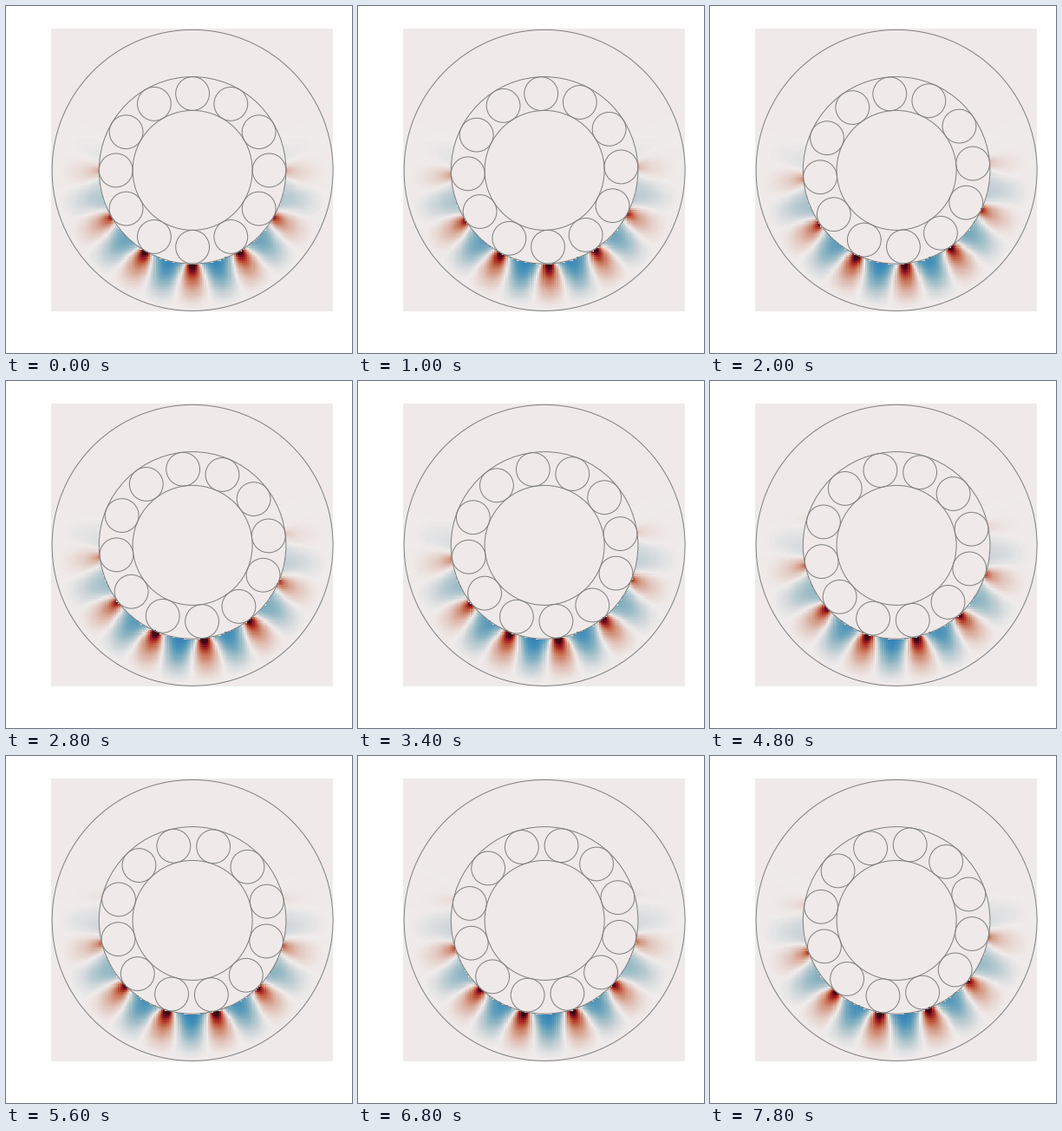
Write a matplotlib script that moves like this. It is 399 px wide and 400 px high and loops after 8000 ms.

```python
import numpy as np
import matplotlib.pyplot as plt
from matplotlib.animation import FuncAnimation
from matplotlib.colors import LinearSegmentedColormap
from matplotlib.patches import Circle

W, H, DPI = 399, 400, 100
CX, CY = 215.1, 189.4
R_OUT, R_RACE, R_SHAFT = 162, 107.8, 69
R_ORBIT, R_BALL, N_BALLS = 88.4, 19.4, 12
FRAMES, INTERVAL = 40, 200
STEP = np.radians(30 / 59)          # cage rotation per frame
LEFT, RIGHT, TOP, BOTTOM = 52, 377, 26, 352
CELLS = 151

blues = [(23, 28, 66), (41, 58, 143), (11, 102, 189),
         (69, 144, 185), (142, 181, 194), (210, 216, 219)]
reds = [(230, 210, 204), (213, 157, 137), (196, 101, 72),
        (172, 43, 36), (120, 14, 40), (60, 9, 17)]
stops = [i / 11 for i in range(6)] + [0.5] + [i / 11 for i in range(6, 12)]
colors = [np.array(c) / 255 for c in blues + [(240, 236, 235)] + reds]
cmap = LinearSegmentedColormap.from_list("stress", list(zip(stops, colors)))

# Polar grid; the angle is measured from straight down towards the right.
xs = LEFT + (np.arange(CELLS) + 0.5) * (RIGHT - LEFT) / CELLS
ys = TOP + (np.arange(CELLS) + 0.5) * (BOTTOM - TOP) / CELLS
X, Y = np.meshgrid(xs - CX, ys - CY)
radius = np.hypot(X, Y)
angle = np.arctan2(X, Y)
ring = (radius > R_RACE + 0.2) & (radius < R_OUT)

depth = np.clip((R_OUT - radius) / (R_OUT - R_RACE), 0, 1)
sharp = 0.55 * depth ** 4
load = np.clip(1 - (1 - np.cos(angle)) / 1.4, 0, None) ** 1.5
amp = np.where(ring, 0.78 * load * depth ** 1.5, 0)


def stress(turn):
    """Periodic contact peaks that broaden into a cosine away from the race."""
    c = np.cos(N_BALLS * (angle - turn))
    return amp * (c - sharp) / (1 - 2 * sharp * c + sharp ** 2)


def ball_center(i, turn):
    a = turn + 2 * np.pi * i / N_BALLS
    return CX + R_ORBIT * np.sin(a), CY + R_ORBIT * np.cos(a)


fig = plt.figure(figsize=(W / DPI, H / DPI), dpi=DPI, facecolor="white")
ax = fig.add_axes([0, 0, 1, 1])
ax.set_xlim(0, W)
ax.set_ylim(H, 0)
ax.axis("off")

field = ax.imshow(stress(0), cmap=cmap, vmin=-1, vmax=1,
                  extent=(LEFT, RIGHT, BOTTOM, TOP),
                  interpolation="nearest", aspect="auto")
ax.set_xlim(0, W)
ax.set_ylim(H, 0)


def add_circle(center, r):
    return ax.add_patch(Circle(center, r, fill=False, ec="gray", lw=0.72))


for r in (R_OUT, R_RACE, R_SHAFT):
    add_circle((CX, CY), r)
balls = [add_circle(ball_center(i, 0), R_BALL) for i in range(N_BALLS)]


def update(frame):
    turn = frame * STEP
    field.set_data(stress(turn))
    for i, ball in enumerate(balls):
        ball.center = ball_center(i, turn)
    return [field, *balls]


anim = FuncAnimation(fig, update, frames=FRAMES, interval=INTERVAL,
                     repeat=True, repeat_delay=0, blit=False)
plt.show()
```
